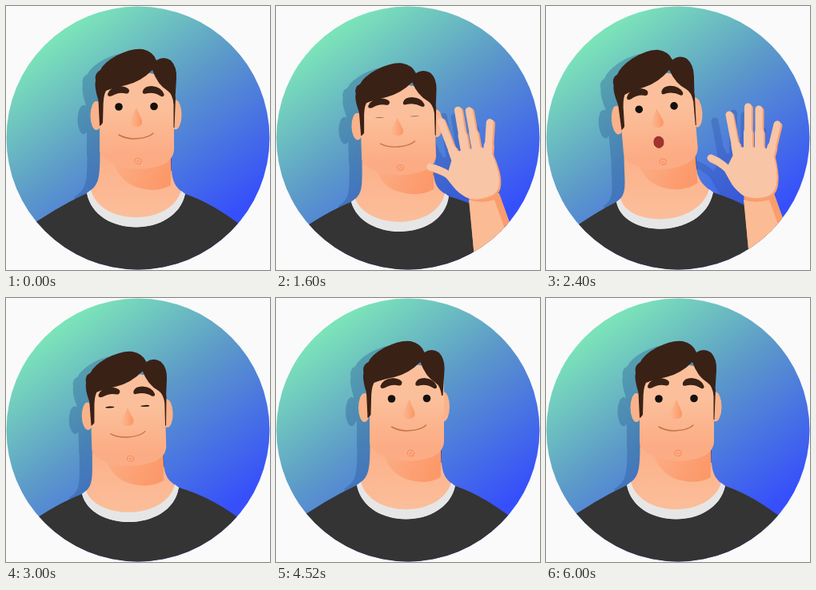
Animation, 330 px wide and 330 px high, one loop 7000 ms. Source, as an HTML page:

```html
<!DOCTYPE html>
<html lang="en">
<head>
<meta charset="utf-8">
<title>Waving man</title>
<style>
html, body { margin: 0; width: 100%; height: 100%; overflow: hidden; background: #fafafa; }
svg { display: block; width: 100vw; height: 100vh; }
</style>
</head>
<body>
<svg viewBox="0 0 330 330">
  <defs>
    <clipPath id="disc"><circle cx="165" cy="165" r="164.5"/></clipPath>
    <linearGradient id="sky" gradientUnits="userSpaceOnUse" x1="41" y1="57" x2="222" y2="306">
      <stop offset="0" stop-color="#7be3b9"/>
      <stop offset=".45" stop-color="#5c99c9"/>
      <stop offset="1" stop-color="#364ffb"/>
    </linearGradient>
    <linearGradient id="skin" x1="0" y1="0" x2="0" y2="1">
      <stop offset=".35" stop-color="#fbc09b"/>
      <stop offset=".85" stop-color="#fcac84"/>
      <stop offset="1" stop-color="#fcac84"/>
    </linearGradient>
    <linearGradient id="neckSkin" x1="0" y1="0" x2="0" y2="1">
      <stop offset="0" stop-color="#fcb089"/>
      <stop offset="1" stop-color="#fbc09c"/>
    </linearGradient>
    <linearGradient id="throat" x1="0" y1="0" x2="1" y2=".3">
      <stop offset="0" stop-color="#fcae86"/>
      <stop offset="1" stop-color="#fc996a"/>
    </linearGradient>
    <linearGradient id="noseSkin">
      <stop offset="0" stop-color="#fb9d6c" stop-opacity=".1"/>
      <stop offset="1" stop-color="#fb9562"/>
    </linearGradient>

    <path id="face" d="M117 95V180Q118 190 135 198Q165 209 194 199Q209 193 210 180V95Q165 70 117 95Z"/>
    <path id="hair" d="M117 150L115.500 118Q110 101 112 93Q110 84 118 80Q122 71 138 62Q158 52 171 54Q184 57 188 68Q197 62 206 68Q214 76 213 91L211 122L209.500 122Q208 110 202 106Q189 98 183 80Q168 95 150 99Q135 102 125 106Q121.500 112 121.500 128L121 146Q119 149 117 150Z"/>
    <ellipse id="earL" cx="113" cy="137" rx="7.5" ry="18"/>
    <ellipse id="earR" cx="212" cy="136" rx="7.5" ry="18.5"/>
    <path id="neck"/>
    <g id="hand">
      <path d="M234 187L243 177H273L284 186Q289 206 288 218Q287 233 278 237Q262 242 248 237Q236 230 230 218L224 207Z"/>
      <g fill="none" stroke-linecap="round" stroke-width="9">
        <path d="M229 136L239 188M252.500 126L252 186M266 129L266 186M289 148L278 194"/>
        <path d="M206 190Q222 196 236 214" stroke-width="9"/>
        <path d="M237 174L240 192M252.500 158V186M266.500 158V186M282 176L278 192" stroke-width="11"/>
      </g>
    </g>
    <path id="arm" d="M247 234L253 304L258 360V600H420L330 360L285 234Z"/>
  </defs>

  <rect width="330" height="330" fill="#fafafa"/>
  <g clip-path="url(#disc)">
    <rect width="330" height="330" fill="url(#sky)"/>

    <g transform="translate(-18 8)" opacity=".3" fill="#2b4aa6" stroke="#2b4aa6">
      <g class="arm"><g class="hand"><use href="#hand"/></g></g>
    </g>
    <g transform="translate(-16 5)" opacity=".33" fill="#24508f">
      <use href="#neck"/>
      <g class="head">
        <use href="#face"/>
        <g class="back"><use href="#earL"/><use href="#hair"/></g>
      </g>
    </g>

    <use href="#neck" fill="url(#neckSkin)"/>
    <g class="head">
      <path d="M206 184V206" stroke="#2c3060"/>
      <path d="M134 194Q142 220 165 227Q188 234 206 224V188Z" fill="url(#throat)"/>
    </g>
    <path id="shirt" fill="#343434"/>
    <path id="collar" fill="#e6e6e6"/>

    <g class="head">
      <g class="back" fill="#fab28b"><use href="#earL"/><use href="#earR"/></g>
      <use href="#face" fill="url(#skin)"/>
      <g class="back" fill="#3a2116">
        <use href="#hair"/>
        <path id="burn" d="M209.500 118L212 112L210.500 152H209.500Z"/>
      </g>
      <g id="features">
        <g fill="#3a2116">
          <path d="M127 110Q130 101 143 100Q152 101 154 105Q154 110 150 109.500Q141 107 132 112.500Q127 114 127 110Z"/>
          <path d="M171 106Q173 100 182 100Q194 101 197.500 110Q198 114 194 113Q185 107 175 109.500Q170 111 171 106Z"/>
        </g>
        <ellipse class="eye" cx="141" cy="126" fill="#15100e"/>
        <ellipse class="eye" cx="185" cy="125.500" fill="#15100e"/>
        <path d="M163 127L170 143Q171 151 163 151Q153 150 156 142Z" fill="url(#noseSkin)"/>
        <path id="smile" d="M141 161Q150 166.500 163 165.800Q178 165 184 159" fill="none" stroke="#c6744a" stroke-width="1.500" stroke-linecap="round"/>
        <ellipse id="oh" cx="162" cy="169" fill="#a2332d" stroke="#8f2d27"/>
        <path d="M161 196Q160 190 165 190Q170 191 169 195Q167 199 163 197M164 195Q164 193 166 194" fill="none" stroke="#f78e60" stroke-width="1.200" stroke-linecap="round"/>
      </g>
    </g>

    <g class="arm">
      <use href="#arm" fill="#fa9d6c"/>
      <path d="M247 242L253 304L258 360V600H410L321 360L279 242Q262 248 247 242Z" fill="#fbbb94"/>
      <g class="hand">
        <use href="#hand" transform="translate(2 1.800)" fill="#f9a273" stroke="#f9a273"/>
        <use href="#hand" fill="#f8c5a6" stroke="#f8c5a6"/>
      </g>
    </g>
  </g>
</svg>
<script>
const LOOP = 7000, STEP = 40;
const $ = id => document.getElementById(id);
const all = (name, attr, value) =>
  document.querySelectorAll('.' + name).forEach(el => el.setAttribute(attr, value));
const ease = u => u * u * (3 - 2 * u);

// Eased value of a list of [time, ...values] keys.
function track(t, keys) {
  if (t <= keys[0][0]) return keys[0].slice(1);
  for (let i = 1; i < keys.length; i++) {
    const a = keys[i - 1], b = keys[i];
    if (t < b[0]) {
      const u = ease((t - a[0]) / (b[0] - a[0]));
      return a.slice(1).map((v, k) => v + (b[k + 1] - v) * u);
    }
  }
  return keys[keys.length - 1].slice(1);
}

// Head x, y, angle, height; collar left x, y, right x, y, bottom x, y.
const rest = [0, 0, 0, 1, 0, 0, 0, 0, 0, 0];
const nudge = [-2, 0, -.4, 1, 0, 0, 0, 0, 0, 0];
const dip = [-8, 4.5, -1.7, .933, -7, 11, -8, 3, -4, 5.5];
const lean = [-14, .8, -5, 1, -13, 11, -15, -2, -15, 2];
const low = [-8, 4.3, -1.5, .955, -6, 11, -8, 2, -5, 3.5];
const poses = [[840, ...rest], [1100, ...nudge], [1480, ...dip], [1640, ...dip], [2000, ...lean],
  [2480, ...lean], [2840, ...low], [3000, ...low], [3240, ...nudge], [3440, ...rest]];
const turns = [[3640, 0], [4040, 1], [4720, 1], [5120, 0]];
const lifts = [[1140, 20, 220], [1460, -6, 0], [1640, -6, 0], [2000, 0, 0], [2560, 0, 0], [2920, 20, 220]];
const waves = [[1140, 12], [1400, 6], [1600, -10], [1840, 8], [2080, -10], [2320, 4], [2400, 0], [2560, -6], [2880, 10]];
const talk = [[1960, 0], [2120, 1], [2480, 1], [2640, 0]];
const blinks = [820, 1600, 3030, 5720];

function draw(t) {
  const [x, y, angle, tall, lx, ly, rx, ry, bx, by] = track(t, poses);
  const [turn] = track(t, turns);
  const [open] = track(t, talk);
  const [ax, ay] = track(t, lifts);
  const [wave] = track(t, waves);

  all('head', 'transform',
    `translate(${163 + x} ${250 + y}) rotate(${angle}) scale(1 ${tall}) translate(-163 -250)`);
  all('back', 'transform', `translate(${-2.5 * turn} 0)`);
  $('features').setAttribute('transform', `translate(${3.5 * turn} 0)`);
  $('burn').setAttribute('opacity', 1 - turn);

  const r = angle * Math.PI / 180, c = Math.cos(r), s = Math.sin(r);
  const onHead = (px, py) => {
    const dx = px - 163, dy = (py - 250) * tall;
    return [163 + x + dx * c - dy * s, 250 + y + dx * s + dy * c];
  };
  const [jx, jy] = onHead(117.5, 180), [kx, ky] = onHead(206, 180);
  const L = [101 + lx, 234 + ly], R = [224 + rx, 235 + ry];
  const l = [L[0] + 5, L[1] - 4], q = [R[0] - 5, R[1] - 4];
  const base = 290.5 + by + (by - (ly + ry) / 2) / 3;
  const outer = `C${112 + bx} ${base} ${212 + bx} ${base} ${R}`;

  $('neck').setAttribute('d', `M${jx} ${jy}C${jx} ${jy + 38} ${L[0] + 15} ${L[1] - 10} ${L}` +
    `${outer}C${R[0] - 15} ${R[1] - 10} ${kx} ${ky + 38} ${kx} ${ky}Z`);
  $('shirt').setAttribute('d', `M20 340V${282 + ly / 2}Q62 ${252 + ly / 2} ${L}${outer}` +
    `Q258 ${246 + ly / 4} 300 ${279 + ly / 4}V340Z`);
  $('collar').setAttribute('d', `M${L}${outer}L${q}C${205 + bx} ${base - 15} ${119 + bx} ${base - 15} ${l}Z`);

  const near = Math.min(...blinks.map(b => Math.abs(t - b)));
  const lid = ease(Math.min(1, near / 150));
  all('eye', 'rx', 5.5 - .7 * lid);
  all('eye', 'ry', .6 + 4.2 * lid);
  all('eye', 'opacity', Math.min(1, .45 + 12 * lid));

  $('smile').setAttribute('opacity', open < .3 ? 1 : 0);
  $('oh').setAttribute('opacity', open < .3 ? 0 : 1);
  $('oh').setAttribute('rx', 9 - 3 * open);
  $('oh').setAttribute('ry', 7 * open);

  all('arm', 'transform', `translate(${ax} ${ay})`);
  all('arm', 'visibility', ay > 215 ? 'hidden' : 'visible');
  all('hand', 'transform', `rotate(${wave} 267 237)`);
}

const start = performance.now();
function tick() {
  const t = (performance.now() - start) % LOOP;
  draw(Math.floor(t / STEP) * STEP);
  requestAnimationFrame(tick);
}
tick();
</script>
</body>
</html>
```
